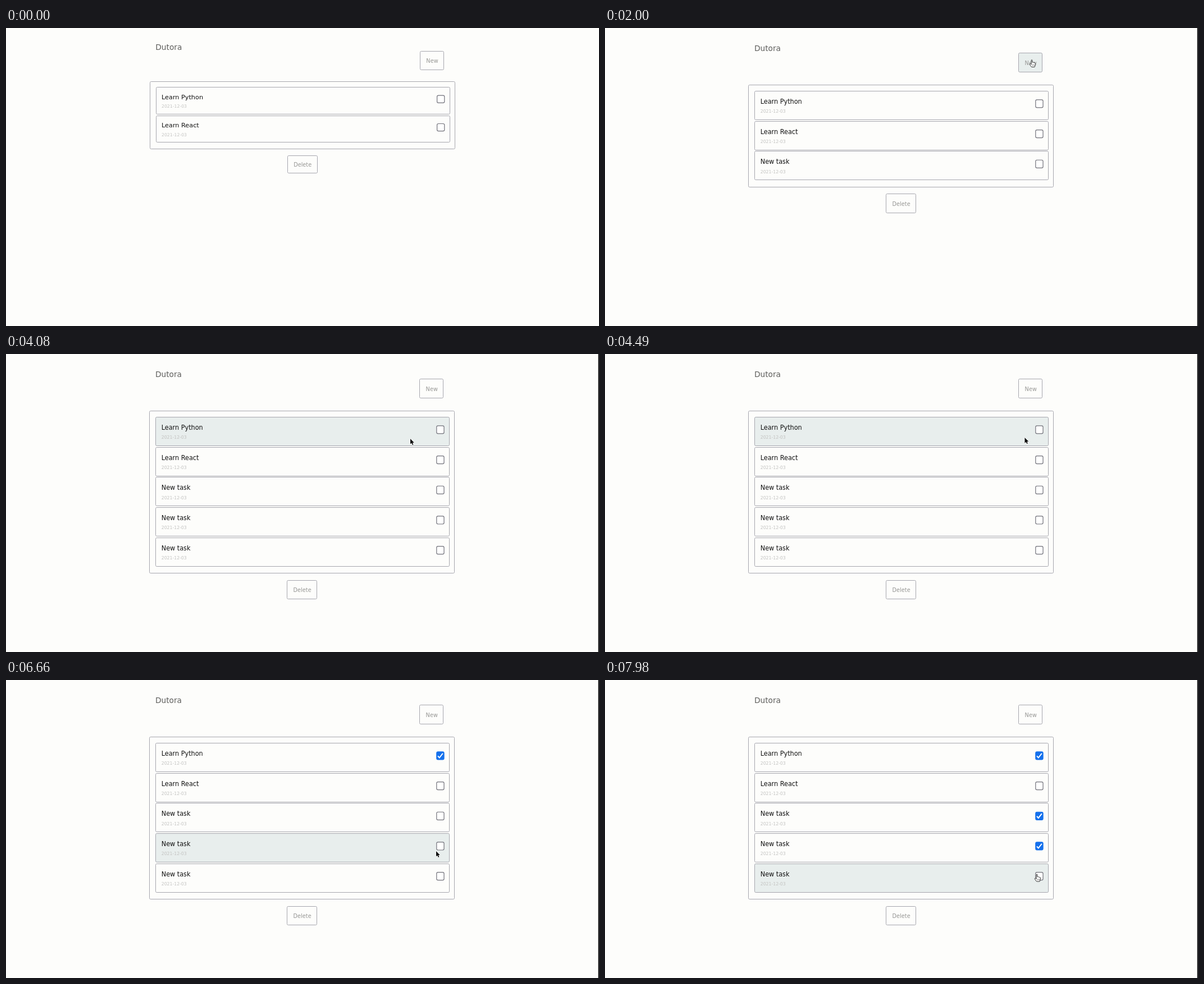
An HTML page with a canvas that plays this animation: 1056x531 px, repeating every 8000 ms.

```html
<!DOCTYPE html>
<html lang="en">
<head>
<meta charset="utf-8">
<title>Task list</title>
<style>
  html, body { margin: 0; width: 100%; height: 100%; overflow: hidden; background: #fdfdfb; }
  canvas { display: block; }
</style>
</head>
<body>
<canvas id="stage" width="1056" height="531"></canvas>
<script>
const ctx = document.getElementById('stage').getContext('2d');
const LOOP = 8000, STEP = 50.4;
const BG = '#fdfdfb', HOVER = '#e8eeed', LINE = '#a6a6ae', BLUE = '#1470ec';

// Time at which each row appears and is ticked
const tasks = [
  { name: 'Learn Python', from: 0, done: 5440 },
  { name: 'Learn React', from: 0 },
  { name: 'New task', from: 1850, done: 7000 },
  { name: 'New task', from: 2550, done: 7430 },
  { name: 'New task', from: 3540 }
];

// Pointer hot spot: time, x, y
const path = [
  [250, 190, -16], [600, 278, 31], [810, 335, 44], [1200, 610, 60],
  [1610, 760, 56.5], [3700, 760, 56.5], [4080, 720, 151], [4500, 748, 149],
  [5000, 769, 140.5], [5490, 769, 140.5], [6170, 764, 328], [6290, 764, 328],
  [6660, 766, 305], [6900, 769, 244], [7060, 769, 244], [7350, 769, 297],
  [7470, 769, 297], [7840, 769, 346], [8000, 769, 346]
];

const arrow = new Path2D('M0 0V9.6L2.2 7.6L3.8 11L5.4 10.3L3.9 7H6.8Z');
const hand = new Path2D('M-.9 .8Q0 -.6 .9 .8V4.6Q2 3.9 2.7 5Q3.8 4.4 4.5 5.5Q6.4 5.1 6.4 7V9.3L5 13H-.4L-3.8 8.6Q-4 7 -2.6 7.2L-.9 8.6Z');
const beam = new Path2D('M-2.6 -6H-.7L0 -5.4L.7 -6H2.6M0 -5.4V5.4M-2.6 6H-.7L0 5.4L.7 6H2.6');

let sx = 1, sy = 1;

const slope = (i, k) => (path[i + 1][k] - path[i][k]) / (path[i + 1][0] - path[i][0]);

function tangent(i, k) {
  if (i === 0 || i === path.length - 1) return 0;
  const a = slope(i - 1, k), b = slope(i, k);
  return a * b <= 0 ? 0 : 2 * a * b / (a + b);
}

function pointerAt(t) {
  if (t < path[0][0]) return null;
  const i = Math.max(0, path.findIndex(p => p[0] > t) - 1);
  const d = path[i + 1][0] - path[i][0], u = (t - path[i][0]) / d;
  const s = u * u * (3 - 2 * u);
  const at = k => path[i][k] + (path[i + 1][k] - path[i][k]) * s
    + d * u * (1 - u) * ((1 - u) * tangent(i, k) - u * tangent(i + 1, k));
  return { x: at(1), y: at(2) };
}

const inside = (p, x0, y0, x1, y1) =>
  !!p && p.x >= x0 * sx && p.x <= x1 * sx && p.y >= y0 * sy && p.y <= y1 * sy;

// Layout edges are scaled, then snapped so that borders stay crisp
function frame(x0, y0, x1, y1, fill) {
  const l = Math.round(x0 * sx - 0.3) + 0.5, t = Math.round(y0 * sy) + 0.5;
  const r = Math.round(x1 * sx - 0.3) - 0.5, b = Math.round(y1 * sy) - 0.5;
  ctx.beginPath();
  ctx.roundRect(l, t, r - l, b - t, 2);
  ctx.fillStyle = fill;
  ctx.fill();
  ctx.strokeStyle = LINE;
  ctx.lineWidth = 1;
  ctx.stroke();
}

function label(str, x, y, size, color, align = 'left') {
  ctx.save();
  ctx.scale(sx, sy);
  ctx.font = size + 'px "DejaVu Sans", Verdana, sans-serif';
  ctx.textAlign = align;
  ctx.fillStyle = color;
  ctx.fillText(str, x, y);
  ctx.restore();
}

function button(str, x0, y0, x1, y1, hot) {
  frame(x0, y0, x1, y1, hot ? HOVER : BG);
  label(str, (x0 + x1) / 2, (y0 + y1) / 2 + 3.7, 9.75, '#969694', 'center');
}

function checkbox(y, on) {
  ctx.save();
  ctx.translate(774.2 * sx, y * sy);
  ctx.beginPath();
  ctx.roundRect(-6.6, -6.6 * sy, 13.2, 13.2 * sy, 2.4);
  ctx.fillStyle = ctx.strokeStyle = on ? BLUE : '#ffffff';
  ctx.fill();
  if (!on) ctx.strokeStyle = '#71717a';
  ctx.lineWidth = 1.2;
  ctx.stroke();
  if (on) {
    ctx.beginPath();
    ctx.moveTo(-4.4, 0.5);
    ctx.lineTo(-1.6, 3.6);
    ctx.lineTo(4.4, -4.2);
    ctx.strokeStyle = '#fff';
    ctx.lineWidth = 2;
    ctx.stroke();
  }
  ctx.restore();
}

function row(task, i, t, p) {
  const y = 105.3 + STEP * i, mid = y + 21.4;
  frame(267, y, 791, y + 48.6, inside(p, 267, y, 790, y + 48) ? HOVER : BG);
  label(task.name, 277, y + 21.4, 11.25, '#111');
  label('2021-12-03', 277, y + 36.8, 7.75, '#c3c3c1');
  checkbox(mid, t >= task.done);
  return inside(p, 767, mid - 7, 781, mid + 7);
}

function cursor(p, kind) {
  ctx.save();
  ctx.translate(p.x, p.y);
  ctx.lineJoin = 'round';
  if (kind === 'text') {
    ctx.strokeStyle = '#777';
    ctx.lineWidth = 0.9;
    ctx.stroke(beam);
  } else if (kind === 'hand') {
    ctx.fillStyle = '#fff';
    ctx.strokeStyle = '#333';
    ctx.lineWidth = 1;
    ctx.fill(hand);
    ctx.stroke(hand);
    ctx.beginPath();
    for (const x of [1, 2.8, 4.6]) {
      ctx.moveTo(x, 8.4);
      ctx.lineTo(x, 10.8);
    }
    ctx.lineWidth = 0.6;
    ctx.stroke();
  } else {
    ctx.strokeStyle = '#fff';
    ctx.lineWidth = 1.2;
    ctx.stroke(arrow);
    ctx.fillStyle = '#0a0a0a';
    ctx.fill(arrow);
  }
  ctx.restore();
}

function draw(t) {
  const resized = t >= 50;
  sx = resized ? 0.999 : 1;
  sy = resized ? 1.065 : 1;
  ctx.fillStyle = BG;
  ctx.fillRect(0, 0, 1056, 531);

  const p = pointerAt(t);
  const shown = tasks.filter(task => t >= task.from);
  const extra = STEP * (shown.length - 2);
  const onNew = inside(p, 738, 41, 780, 74);

  label('Dutora', 266.3, 38.8, 13.7, '#5e5e5c');
  button('New', 737.5, 41.4, 780.5, 74.6, onNew);
  frame(256, 95, 800.5, 216.3 + extra, BG);
  let onBox = false;
  shown.forEach((task, i) => { if (row(task, i, t, p)) onBox = true; });
  button('Delete', 501, 227 + extra, 555.3, 259.4 + extra, false);

  if (resized) {
    ctx.fillStyle = '#000';
    ctx.fillRect(1054.7, 0, 1.3, 531);
  }
  if (p) {
    const onTitle = inside(p, 266, 25, 313, 44);
    cursor(p, onNew || onBox ? 'hand' : onTitle ? 'text' : 'arrow');
  }
}

let start;
function tick(now) {
  start ??= now;
  draw((now - start) % LOOP);
  requestAnimationFrame(tick);
}
draw(0);
requestAnimationFrame(tick);
</script>
</body>
</html>
```
